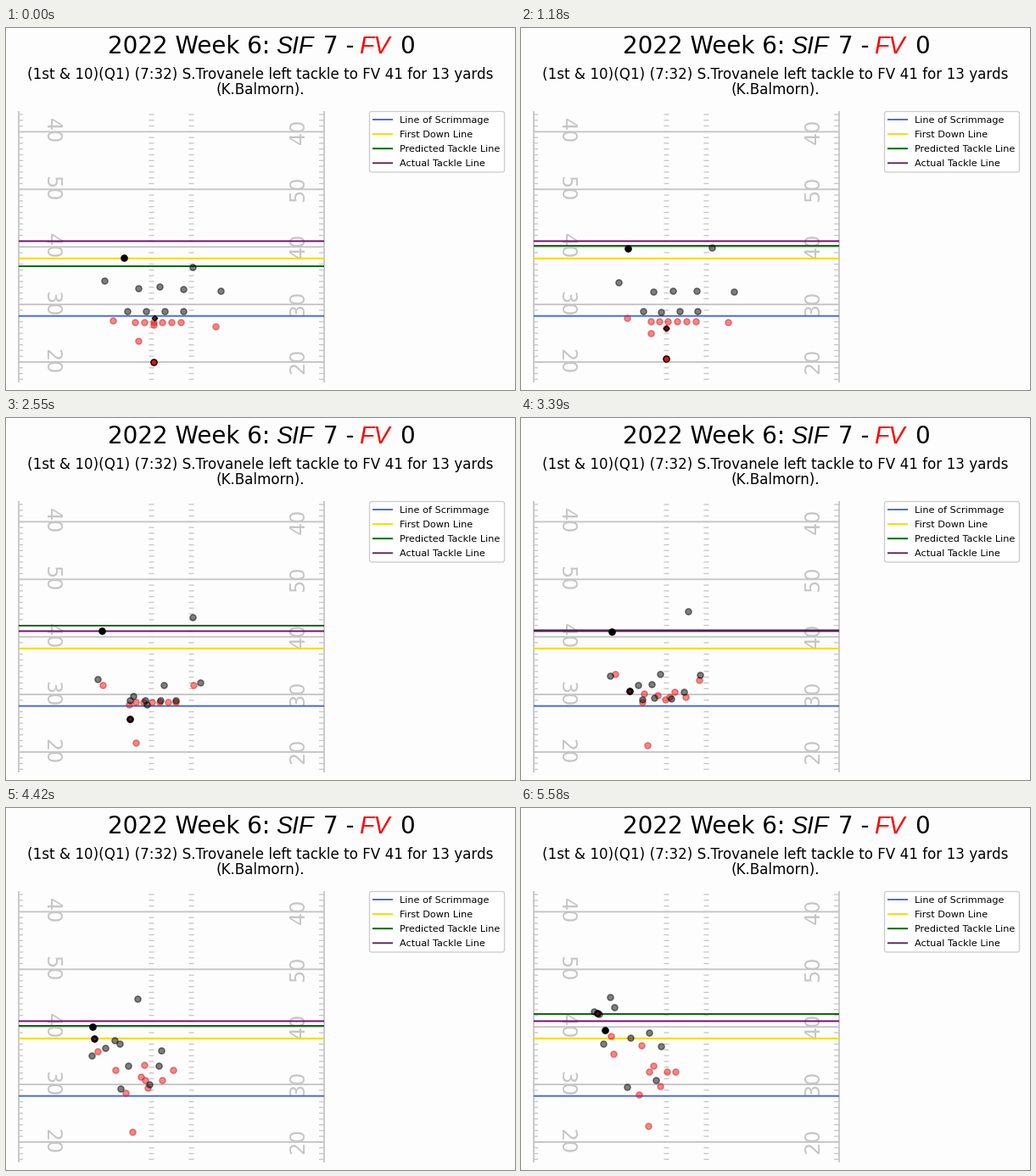
A matplotlib script that plays this animation: 600 px wide and 427 px high, repeating every 5610 ms.

```python
import numpy as np
import matplotlib.pyplot as plt
from matplotlib.animation import FuncAnimation
from matplotlib.patches import FancyBboxPatch

W, H, DPI = 600, 427, 64
PT = 72 / DPI  # points per pixel
FRAMES, STEP = 187, 30
SNAP, MESH, END = 700, 2550, 5580  # ball snapped, lines engaged, tackle
GRAY = "#c6c6c6"
LEFT, RIGHT, TOP, BOTTOM = 15, 375, 98, 418

plt.rcParams["font.family"] = "DejaVu Sans"
fig = plt.figure(figsize=(W / DPI, H / DPI), dpi=DPI, facecolor="#fdfdfd")
ax = fig.add_axes([0, 0, 1, 1])
ax.set_xlim(0, W)
ax.set_ylim(H, 0)
ax.axis("off")


def label(x, y, s, px, **kw):
    kw.setdefault("va", "baseline")
    return ax.text(x, y, s, fontsize=px * PT, **kw)


def hline(y, color, x0=LEFT, x1=RIGHT, z=2):
    return ax.plot([x0, x1], [y, y], color=color, lw=1.9 * PT, zorder=z,
                   solid_capstyle="butt", snap=False)[0]


def yard_y(n):
    """Stage height of the line n yards past the lower 20."""
    return 394 - 6.79 * n


def draw_titles():
    team = dict(family="Liberation Sans", style="italic")
    label(119.5, 30.5, "2022 Week 6:", 27.8)
    label(318, 30.5, "SIF", 28.5, **team)
    label(374, 30.5, "7 -", 27.8)
    label(416.5, 30.5, "FV", 28.5, color="red", **team)
    label(464, 30.5, "0", 27.8)
    label(300, 60, "(1st & 10)(Q1) (7:32) S.Trovanele left tackle to FV 41"
          " for 13 yards", 16.75, ha="center")
    label(300, 78, "(K.Balmorn).", 16.75, ha="center")


def draw_field():
    ax.vlines([LEFT, RIGHT - 0.5], TOP, BOTTOM, color=GRAY, lw=1.8 * PT, zorder=1)
    ticks = yard_y(np.arange(-3, 44))
    for x0, x1 in [(LEFT, 20), (168.5, 174.5), (215.5, 221.5), (369, RIGHT)]:
        ax.hlines(ticks, x0, x1, color=GRAY, lw=1.3 * PT, zorder=1, snap=False)
    for n, mark in zip(range(0, 50, 10), ("20", "30", "40", "50", "40")):
        y = yard_y(n)
        hline(y, GRAY, z=1)
        for x, turn in ((53.5, -90), (344.5, 90)):
            label(x, y - 1, mark, 23.7, color=GRAY, rotation=turn,
                  ha="center", va="center", zorder=1)


def draw_legend():
    ax.add_patch(FancyBboxPatch((430.5, 100.5), 155, 67.5, fc="white", ec="#cccccc",
                                boxstyle="round,pad=2,rounding_size=2.5", lw=1.3 * PT))
    rows = (("Line of Scrimmage", "royalblue"), ("First Down Line", "gold"),
            ("Predicted Tackle Line", "darkgreen"), ("Actual Tackle Line", "#5f1f5f"))
    for i, (name, color) in enumerate(rows):
        y = 108 + 17.1 * i
        hline(y, color, 432, 456)
        label(464, y + 4, name, 11.2)


def path(*points, start=SNAP, stop=False):
    """Smooth run through set-up, mesh and end; waits until start."""
    keys = np.array([start, MESH, END])
    pts = np.array(points, float)
    slope = np.gradient(pts, keys, axis=0)
    if start:
        slope[0] = 0
    if stop:
        slope[2] = 0

    def at(t):
        t = max(t, start)
        i = int(t >= MESH)
        h = keys[i + 1] - keys[i]
        u = (t - keys[i]) / h
        v = 1 - u
        return ((1 + 2 * u) * v * v * pts[i] + u * v * v * h * slope[i]
                + u * u * (3 - 2 * u) * pts[i + 1] - u * u * v * h * slope[i + 1])
    return at


def blend(a, b, t0, t1):
    """Follow path a, then pass over to path b between t0 and t1."""
    def at(t):
        u = np.clip((t - t0) / (t1 - t0), 0, 1)
        u = u * u * (3 - 2 * u)
        return (1 - u) * a(t) + u * b(t)
    return at


class Group:
    def __init__(self, face, edge, z, marker="o", size=7.2):
        self.paths = []
        self.dots = ax.scatter([], [], s=(size * PT) ** 2, marker=marker, zorder=z,
                               facecolors=[face], edgecolors=[edge], linewidths=1.4 * PT)

    def add(self, *paths):
        self.paths += paths

    def move(self, t):
        self.dots.set_offsets([p(t) for p in self.paths])


draw_titles()
draw_field()
draw_legend()
hline(yard_y(8), "royalblue")
hline(yard_y(18), "gold")
hline(yard_y(21), "purple", z=4)
predicted = hline(281, "darkgreen", z=3)

offense = Group((0.96, 0.06, 0.06, 0.5), (0.8, 0.12, 0.12, 0.5), 5)
runner = Group("#e01010", "black", 6)
defense = Group((0, 0, 0, 0.5), (0, 0, 0, 0.5), 7)
tackler = Group("black", "black", 8)
ball = Group("#701414", "black", 9, "D", 4.5)

back = path((174, 394), (146, 355), (90, 242), stop=True)
passer = path((174, 350), (153, 383), (150, 375))
runner.add(back)
ball.add(blend(blend(lambda t: np.array([175, 342]), passer, SNAP, 1180),
               back, 1600, 2250))

# receivers, fullback, passer
offense.add(path((126, 345), (114, 315), (106, 269)),
            path((247, 352), (221, 315), (182, 311)),
            path((156, 369), (145, 338), (139, 338), start=300),
            passer)
# both lines set up evenly spaced, then break apart
for i, end in enumerate([(109, 290), (156, 304), (164, 328),
                         (151, 311), (142, 280), (172, 311)]):
    offense.add(path((152 + 10.8 * i, 347), (153 + 9.4 * i, 335), end))
for i, end in enumerate([(125, 329), (110, 235), (159, 321), (165, 281)]):
    defense.add(path((143 + 22 * i, 334), (146 + 18 * i, 333), end))

# linebackers, corners, safeties
defense.add(path((156, 307), (150, 328), (92, 243)),
            path((181, 305), (166, 338), (129, 271)),
            path((209, 308), (186, 315), (86, 240)),
            path((116, 298), (108, 308), (97, 278)),
            path((253, 310), (229, 312), (151, 265)),
            path((220, 282), (220, 235), (105, 223), start=0))
tackler.add(path((139, 271), (113, 251), (99, 262), start=0, stop=True))

groups = (offense, runner, defense, tackler, ball)


def update(i):
    t = i * STEP
    y = np.interp(t, [0, 1940, 4420, END], [281, 241, 257, 243])
    predicted.set_ydata([y, y])
    for g in groups:
        g.move(t)
    return [predicted] + [g.dots for g in groups]


anim = FuncAnimation(fig, update, frames=FRAMES, interval=STEP, repeat=True,
                     repeat_delay=0, blit=False)
plt.show()
```
